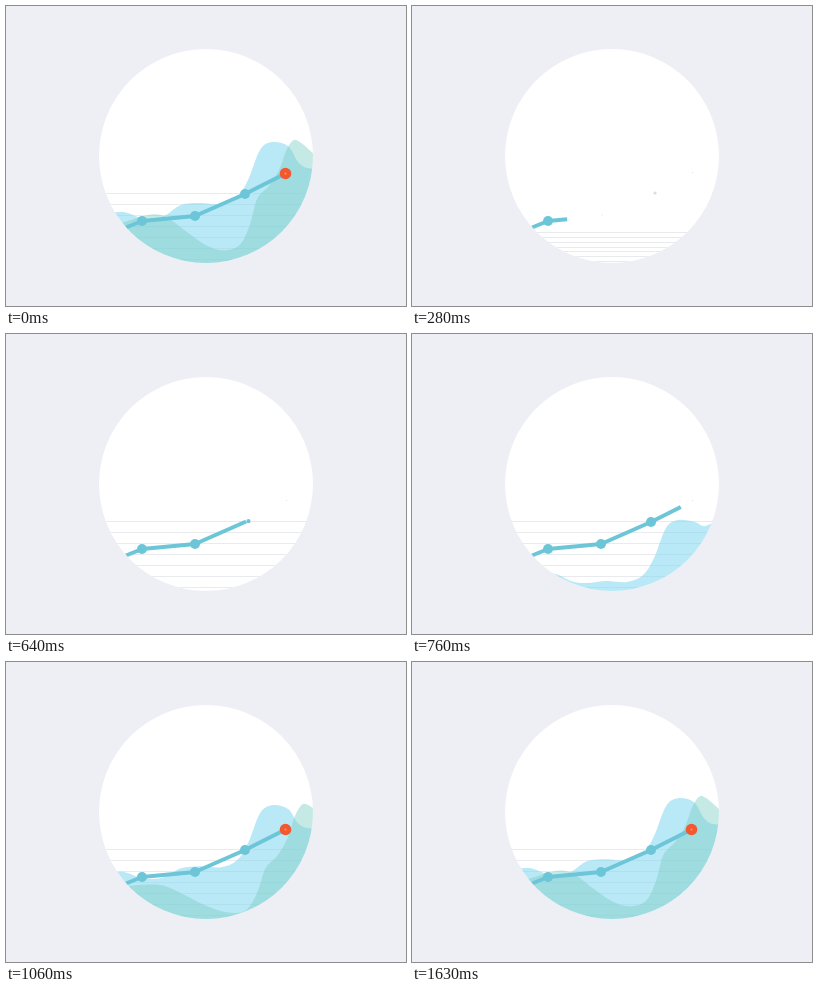
An HTML page with a canvas that plays this animation: 400x300 px, repeating every 1.69 s.

```html
<!DOCTYPE html>
<html lang="en">
<head>
<meta charset="utf-8">
<title>Growth chart</title>
<style>
  html, body { margin: 0; width: 100%; height: 100%; overflow: hidden; background: #eeeff5; }
  canvas { display: block; }
</style>
</head>
<body>
<canvas id="stage" width="400" height="300"></canvas>
<script>
const ctx = document.getElementById('stage').getContext('2d');
const LOOP = 1690, HOLD = 100, STEP = 30;
const TEAL = '#6cc6d7', RED = '#f4582f', FAINT = '#d3e1e6';

const clamp = v => Math.max(0, Math.min(1, v));
const progress = (t, from, to) => clamp((t - from) / (to - from));
const mix = (a, b, k) => a + (b - a) * k;
const easeOut = k => 1 - (1 - k) ** 2;

// Each wave settles exponentially from an offset, reached at "from", to its resting curve.
const waves = [
  {
    color: 'rgba(138,217,240,.6)', from: 760, decay: 155,
    rest: [[100, 207], [118, 206], [132, 211], [146, 213], [160, 209], [175, 199], [195, 197],
           [215, 198], [231, 191], [242, 174], [254, 144], [266, 136], [282, 140], [292, 156],
           [301, 162], [312, 162]],
    offset: x => [0, 27 + 23 * progress(x, 145, 175) * (1 - progress(x, 280, 300))]
  },
  {
    color: 'rgba(120,204,193,.43)', from: 880, decay: 190,
    rest: [[100, 222], [118, 216], [145, 208], [161, 211], [180, 225], [200, 239], [218, 244],
           [234, 238], [244, 217], [251, 192], [263, 179], [273, 163], [280, 144], [287, 134],
           [294, 136], [310, 150]],
    offset: x => [22 * progress(x, 205, 250), 25 + 13 * Math.cos((x - 150) / 108 * 2 * Math.PI)]
  }
];

const trend = [[120, 221.5], [136, 215], [189, 210], [239, 188], [279.5, 167.5]];
const [peakX, peakY] = trend[trend.length - 1];
const lengths = trend.slice(1).map(([x, y], i) => Math.hypot(x - trend[i][0], y - trend[i][1]));
const total = lengths.reduce((a, b) => a + b);
const DRAW_START = 100, DRAW_END = 804, DRAW_POWER = 1.13, POP = 70;
const lengthAt = t => total * progress(t, DRAW_START, DRAW_END) ** DRAW_POWER;
const timeAt = length => mix(DRAW_START, DRAW_END, (length / total) ** (1 / DRAW_POWER));

function disc(x, y, r, color) {
  ctx.fillStyle = color;
  ctx.beginPath();
  ctx.arc(x, y, r, 0, 2 * Math.PI);
  ctx.fill();
}

function drawGrid(t) {
  const k = Math.sin(progress(t, 127, 667) * Math.PI / 2);
  ctx.fillStyle = '#e9eaed';
  for (let i = 0; i < 7; i++) ctx.fillRect(93, Math.round(256 - k * (3 + 11 * i)), 214, 1);
}

function drawWave({ color, from, decay, rest, offset }, t) {
  const left = Math.exp((from - t) / decay);
  const pts = rest.map(([x, y]) => {
    const [dx, dy] = offset(x);
    return [x + dx * left, y + dy * left];
  });
  const last = pts.length - 1;

  // Catmull-Rom curve through the points, closed below the circle
  ctx.beginPath();
  ctx.moveTo(pts[0][0], 300);
  ctx.lineTo(...pts[0]);
  for (let i = 0; i < last; i++) {
    const a = pts[Math.max(0, i - 1)], b = pts[i], c = pts[i + 1], d = pts[Math.min(last, i + 2)];
    ctx.bezierCurveTo(b[0] + (c[0] - a[0]) / 6, b[1] + (c[1] - a[1]) / 6,
                      c[0] - (d[0] - b[0]) / 6, c[1] - (d[1] - b[1]) / 6, ...c);
  }
  ctx.lineTo(pts[last][0], 300);
  ctx.fillStyle = color;
  ctx.fill();
}

function drawTrend(t) {
  const drawn = lengthAt(t), dots = [];
  let passed = 0;
  ctx.strokeStyle = TEAL;
  ctx.lineWidth = 4;
  ctx.lineCap = 'butt';
  ctx.lineJoin = 'round';
  ctx.beginPath();
  ctx.moveTo(...trend[0]);
  lengths.forEach((length, i) => {
    const [x0, y0] = trend[i], [x, y] = trend[i + 1];
    const k = clamp((drawn - passed) / length);
    if (k > 0) ctx.lineTo(mix(x0, x, k), mix(y0, y, k));
    passed += length;

    // The third dot waits a little larger and to the right
    const reached = timeAt(passed), pop = easeOut(progress(t, reached, reached + POP));
    const third = i === 2, end = i === lengths.length - 1;
    dots.push([x + (third ? 4 : 1) * (1 - pop), y - (1 - pop),
               mix(third ? 1.6 : 0.6, end ? 5.8 : 5, pop),
               pop === 0 ? FAINT : end ? RED : TEAL]);
  });
  ctx.stroke();
  dots.forEach(dot => disc(...dot));
  if (t > DRAW_END + POP) disc(peakX, peakY, 1, '#fb9a76');
}

function drawSparks(t) {
  const p = progress(t, 800, 960);
  if (p === 0 || p === 1) return;
  const inner = 7.5 + 10 * p * p, outer = 7.5 + 10 * easeOut(p);
  ctx.lineWidth = 2.8;
  ctx.lineCap = 'round';
  for (const degrees of [-95, -43, 10]) {
    const a = degrees * Math.PI / 180, c = Math.cos(a), s = Math.sin(a);
    ctx.beginPath();
    ctx.moveTo(peakX + c * inner, peakY + s * inner);
    ctx.lineTo(peakX + c * outer, peakY + s * outer);
    ctx.stroke();
  }
}

function draw(now) {
  const time = now % LOOP;
  const t = time < HOLD ? LOOP : HOLD + Math.floor((time - HOLD) / STEP) * STEP;
  ctx.fillStyle = '#eeeff5';
  ctx.fillRect(0, 0, 400, 300);
  disc(200, 150, 107, '#fff');
  ctx.save();
  ctx.clip();
  drawGrid(t);
  waves.forEach(wave => drawWave(wave, t));
  drawTrend(t);
  drawSparks(t);
  ctx.restore();
}

const start = performance.now();
function tick() {
  draw(performance.now() - start);
  requestAnimationFrame(tick);
}
tick();
</script>
</body>
</html>
```
